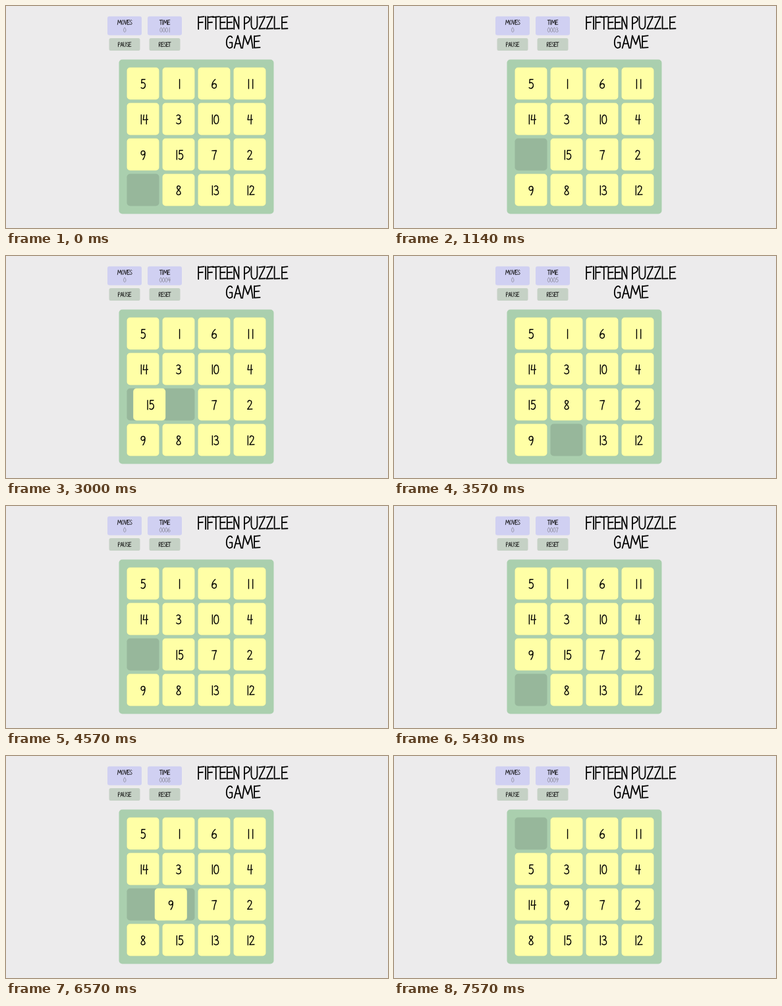
Animation, 580 px wide and 338 px high, one loop 8 s. Source, as an HTML page:

```html
<!DOCTYPE html>
<html lang="en">
<head>
<meta charset="utf-8">
<title>Fifteen puzzle game</title>
<style>
  html, body { margin: 0; width: 100%; height: 100%; overflow: hidden; background: #ecebec; }
  svg { display: block; width: 580px; height: 338px; }
  text { fill: transparent; stroke: none; text-anchor: middle; font-family: "Open Sans", sans-serif; }
  path { fill: none; stroke-linecap: round; stroke-linejoin: round; }
</style>
</head>
<body>
<svg id="stage" viewBox="0 0 580 338"></svg>
<script>
const LOOP = 8000, MOVE = 270, PITCH = 54, SIZE = 49, LEFT = 183.5, TOP = 93.5;

// Handwritten letters: [advance, strokes], drawn 20 units high.
const GLYPHS = {
  ' ': [4.5, ''],
  A: [13, 'M1 20 6.5 0 12 20M3 13H10.5'],
  E: [11, 'M1.5 .5V19.5M1.5 1 10.5 0M1.5 9.5 9 9M1.5 19.5 10.5 19'],
  F: [10, 'M1 0V20M1 1 10 0M1 9.5 8 9'],
  G: [12.5, 'M10 3C7 -2 1 2 1 11C1 21 7 21 10 18V11H6'],
  I: [5, 'M2.5 0V20'],
  L: [12, 'M1.5 0V19.5L10 19'],
  M: [18.5, 'M1 20 4 0 9.5 14 14.5 0 17.5 20'],
  N: [12, 'M1.5 20V.5L9 19.5V0'],
  O: [12, 'M6 .5C-1 .5 -.5 19.5 6 19.5C12 19.5 12 .5 6 .5'],
  P: [11, 'M1.5 20V1C5 -1 10.5 1 10 5C9.5 9 4 11 1.5 11'],
  R: [11, 'M1.5 20V1C5 -1 10 1 9.5 5C9 9 4 11 1.5 11L10 20'],
  S: [11, 'M9.5 2C6 -2 1 2 2 6C3 9.5 10 10 10 15C10 20 4 21 1 17.5'],
  T: [9.5, 'M-1 1 9.5 0M4 .5V20'],
  U: [13, 'M1.5 0V13C1.5 22 11 22 11 13V0'],
  V: [12, 'M1 0 6 20 11 0'],
  Z: [12, 'M1 1 10.5 0 1 19.5 11 19'],
  0: [12, 'M6 .5C-1 .5 -.5 19.5 6 19.5C12.5 19.5 12 .5 6 .5'],
  1: [9, 'M6.3 0V20'],
  2: [12, 'M1.5 4C2 -1.5 10 -1 9.5 5C9 10 4 14 1 19.5L11 19'],
  3: [12, 'M1.5 2C5 -2 10 1 9 5C8.5 8 6 9 4 9C8 9 11 11 10.5 15C10 20 4 21 1 17.5'],
  4: [12, 'M3 .5 1.5 11 11.5 10M9 0 8.5 20'],
  5: [12, 'M10 0H3L2.5 8C7 5 11 9 10.5 13.5C10 20 4 21 1.5 18'],
  6: [12, 'M8 0C3 4 1 9 1 14C1.5 21 10 21 10.5 14C10.5 8 3 8 1.5 13'],
  7: [12, 'M1 1 10.5 .5C8 6 5.5 13 5 20'],
  8: [12, 'M9.5 3C7 -1.5 1.5 0 2.5 5C3.5 8.5 10 11 10 15.5C10 21 1 21 1.5 15.5C2 11 9.5 8 9.5 3'],
  9: [12, 'M10 5C8 -1.5 1 1 1.5 6.5C2 12 9 11 10 5C10 11 8 17 5.5 20']
};

const START = [5, 1, 6, 11, 14, 3, 10, 4, 9, 15, 7, 2, 0, 8, 13, 12];

// [start time, tile that slides into the gap]
const MOVES = [
  [530, 9], [1530, 9],
  [2530, 9], [2860, 15], [3200, 8],
  [4020, 8], [4290, 15], [4960, 9],
  [5750, 8], [6010, 15],
  [6440, 9], [6840, 14], [7200, 5]
];

const stage = document.getElementById('stage');

function add(parent, tag, attrs) {
  const el = document.createElementNS('http://www.w3.org/2000/svg', tag);
  for (const key in attrs) el.setAttribute(key, attrs[key]);
  parent.append(el);
  return el;
}

function box(parent, x, y, width, height, rx, fill) {
  return add(parent, 'rect', { x, y, width, height, rx, fill });
}

// Stroked lettering over selectable text; returns a function that changes the words.
function lettering(parent, words, cx, cy, height, weight, colour) {
  const group = add(parent, 'g', { stroke: colour });
  const scale = height / 20;
  const write = value => {
    group.replaceChildren();
    const chars = [...value];
    let x = cx - scale * chars.reduce((sum, c) => sum + GLYPHS[c][0], 0) / 2;
    add(group, 'text', { x: cx, y: cy + height / 2, 'font-size': height }).textContent = value;
    for (const c of chars) {
      const [advance, d] = GLYPHS[c];
      if (d) add(group, 'path', {
        d, 'stroke-width': weight / scale,
        transform: `translate(${x} ${cy - height / 2}) scale(${scale})`
      });
      x += advance * scale;
    }
  };
  write(words);
  return write;
}

function stat(x, label, value) {
  box(stage, x, 15.8, 52, 28.7, 3, '#d0d0f2');
  lettering(stage, label, x + 26.3, 24.8, 7, .9, '#111');
  return lettering(stage, value, x + 26.3, 36.4, 7, .65, '#77777f');
}

function button(x, label) {
  box(stage, x, 49, 47, 19, 2.5, '#c5d1c5');
  lettering(stage, label, x + 23.5, 58.5, 6.8, .85, '#111');
}

const place = cell => [LEFT + cell % 4 * PITCH, TOP + (cell >> 2) * PITCH];

stat(154, 'MOVES', '0');
const setTime = stat(215, 'TIME', '0001');
button(156.5, 'PAUSE');
button(217.5, 'RESET');
lettering(stage, 'FIFTEEN PUZZLE', 359.6, 25.7, 19, 1.8, '#000');
lettering(stage, 'GAME', 360, 54.6, 19, 1.8, '#000');

box(stage, 171.5, 81.5, 235, 235, 5, '#aacfae');
START.forEach((_, cell) => box(stage, ...place(cell), SIZE, SIZE, 5, '#97b79b'));

const tiles = {};
START.forEach((number, cell) => {
  if (!number) return;
  const el = add(stage, 'g');
  box(el, 0, 0, SIZE, SIZE, 5, '#ffffa6');
  lettering(el, String(number), SIZE / 2 + .3, 25.2, 14, 1.4, '#000');
  tiles[number] = { el, home: place(cell), slides: [] };
});

const cells = [...START];
for (const [time, number] of MOVES) {
  const from = cells.indexOf(number), to = cells.indexOf(0);
  cells[to] = number;
  cells[from] = 0;
  tiles[number].slides.push({ time, from: place(from), to: place(to) });
}

// Same curve as the CSS "ease" keyword.
function ease(x) {
  if (x <= 0) return 0;
  if (x >= 1) return 1;
  const curve = (s, a, b) => 3 * s * (1 - s) * ((1 - s) * a + s * b) + s ** 3;
  let low = 0, high = 1;
  for (let i = 0; i < 20; i++) {
    const mid = (low + high) / 2;
    if (curve(mid, .25, .25) < x) low = mid; else high = mid;
  }
  return curve(low, .1, 1);
}

function position({ home, slides }, t) {
  const slide = slides.filter(s => s.time <= t).pop();
  if (!slide) return home;
  const k = ease((t - slide.time) / MOVE);
  return slide.from.map((v, i) => v + (slide.to[i] - v) * k);
}

let shown = 1;
function draw(t) {
  for (const number in tiles) {
    const tile = tiles[number];
    tile.el.setAttribute('transform', `translate(${position(tile, t)})`);
  }
  const seconds = 2 + Math.floor((t - 135) / 1000);
  if (seconds !== shown) {
    shown = seconds;
    setTime(String(seconds).padStart(4, '0'));
  }
}

let began;
function tick(now) {
  began ??= now;
  draw((now - began) % LOOP);
  requestAnimationFrame(tick);
}
draw(0);
requestAnimationFrame(tick);
</script>
</body>
</html>
```
